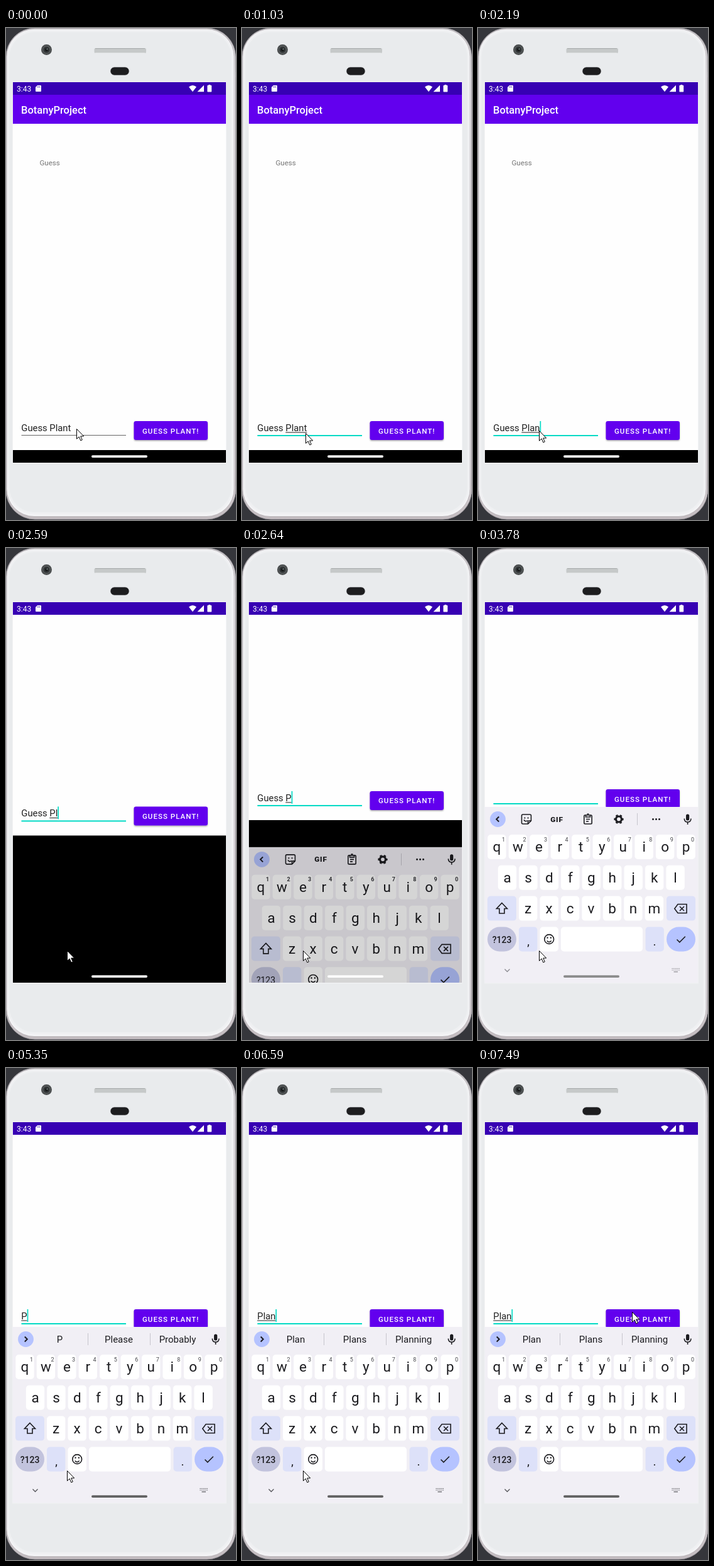
Animation of 366 by 781 pixels, one loop 7990 ms. Source, as an HTML page:

```html
<!DOCTYPE html>
<html lang="en">
<head>
<meta charset="utf-8">
<title>Guess the plant</title>
<style>
html, body { margin: 0; width: 100%; height: 100%; overflow: hidden; background: #35363b; }
svg { display: block; width: 366px; height: 781px; font-family: Roboto, sans-serif; }
text { white-space: pre; }
.line { fill: none; stroke: #1c1c20; stroke-width: 1.6; }
.bold { stroke-width: 2; }
.mid { text-anchor: middle; }
</style>
</head>
<body>
<svg viewBox="0 0 366 781">
  <defs>
    <clipPath id="screen"><rect x="11" y="106" width="339" height="584"/></clipPath>
    <linearGradient id="edge" x2="0" y2="1">
      <stop offset="0" stop-color="#c4c2c5"/><stop offset=".1" stop-color="#e4e2e5"/>
      <stop offset=".9" stop-color="#dcd7da"/><stop offset="1" stop-color="#c2bbbf"/>
    </linearGradient>
    <filter id="lift" x="-10%" y="-20%" width="120%" height="150%">
      <feDropShadow dx="0" dy="1.4" stdDeviation="1" flood-opacity=".35"/>
    </filter>
  </defs>

  <!-- phone -->
  <rect width="366" height="781" fill="#35363b"/>
  <rect x="259" y="0" width="8" height="3" fill="#77757a"/>
  <path d="M365.500 70v8M365.500 727v13" stroke="#77757a"/>
  <rect x="0" y="0" width="365.500" height="780" rx="46" fill="url(#edge)" stroke="#97939a" stroke-width=".8"/>
  <rect x="1" y="1.500" width="362" height="774" rx="44" fill="#f3f3f5" stroke="#a39da2" stroke-width=".6"/>
  <rect x="4" y="5" width="356" height="765" rx="41" fill="#e9ebed" stroke="#eff0f2" stroke-width="3"/>
  <rect x="10" y="85" width="341" height="606.500" fill="#f0f1f3"/>
  <circle cx="64.500" cy="34.500" r="8.500" fill="#4b4e4f"/>
  <circle cx="64.500" cy="34.500" r="5.600" fill="#303435" stroke="#626768"/>
  <circle cx="64.500" cy="34.500" r="2.400" fill="#151718"/>
  <circle cx="65.500" cy="33.500" r="1" fill="#899"/>
  <rect x="140.500" y="32" width="82.500" height="8" rx="2" fill="#c6c9c9"/>
  <path d="M142 32.600h79" stroke="#a6a9a9"/>
  <path d="M142 39.500h79" stroke="#dfe1e1"/>
  <rect x="166" y="62" width="30" height="13" rx="6.500" fill="#1d1d1f" stroke="#cfd1d3" stroke-width=".6"/>

  <g clip-path="url(#screen)">
    <rect x="11" y="106" width="339" height="584" fill="#000"/>
    <g id="app">
      <rect x="11" y="106" width="339" height="564" fill="#fefefe"/>
      <rect x="11" y="106" width="339" height="46" fill="#6200ee"/>
      <text x="24" y="135.500" font-size="16.500" font-weight="500" fill="#fff">BotanyProject</text>
      <text x="53.500" y="217.500" font-size="11.500" fill="#757575">Guess</text>
      <text id="field" x="24.300" y="640" font-size="14.800" fill="#212121"></text>
      <rect id="compose" y="641.500" height="1" fill="#212121"/>
      <rect id="rule" x="24.500" y="646" width="166.500"/>
      <rect id="caret" y="624" width="1.700" height="20" fill="#03dac5"/>
      <rect x="203.500" y="624" width="117.500" height="30" rx="3.300" fill="#6200ee" filter="url(#lift)"/>
      <text x="217" y="643.500" font-size="11.530" font-weight="500" letter-spacing="1.030" fill="#fff">GUESS PLANT!</text>
    </g>

    <g id="board">
      <rect x="11" y="411" width="339" height="279" fill="#f1eff5"/>
      <circle cx="31.500" cy="430.500" r="12.400" fill="#b5c3ff"/>
      <path id="arrow" class="line bold"/>
      <g id="tools">
        <g class="line">
          <path d="M71.500 423h11q2 0 2 2v8l-5 5h-8q-2 0-2-2v-11q0-2 2-2zM84 433h-3q-1.500 0-1.500 1.500v3M73 431.500q2.500 4 6 1"/>
          <path d="M171.500 424h-1q-1.700 0-1.700 1.700v10.600q0 1.700 1.700 1.700h9q1.700 0 1.700-1.700v-10.600q0-1.700-1.700-1.700h-1M171.500 424h7v3h-7zM172 430.500h6M172 434h4"/>
        </g>
        <path d="M73.500 427.500h1.800v2h-1.800zM78.700 427.500h1.800v2h-1.800zM173.500 421.500h3v2h-3z" fill="#1c1c20"/>
        <text x="125.500" y="434.500" class="mid" font-size="11.800" font-weight="800" letter-spacing=".8" fill="#1c1c20">GIF</text>
        <circle cx="224" cy="430.500" r="4.500" fill="none" stroke="#1c1c20" stroke-width="3.200"/>
        <circle cx="224" cy="430.500" r="6.600" fill="none" stroke="#1c1c20" stroke-width="2" stroke-dasharray="3.456" stroke-dashoffset="1.728"/>
        <path d="M253.500 421v19" stroke="#c6c5cc"/>
        <path d="M278.500 430.500h.01M283.500 430.500h.01M288.500 430.500h.01" stroke="#1c1c20" stroke-width="3" stroke-linecap="round"/>
      </g>
      <g id="hints" class="mid" font-size="15" fill="#1c1c20">
        <path d="M130.500 421v19M229.500 421v19" stroke="#c6c5cc"/>
        <text x="85.500" y="436"></text><text x="179.500" y="436"></text><text x="273" y="436"></text>
      </g>
      <rect x="331" y="422.500" width="5.200" height="10" rx="2.600" fill="#1c1c20"/>
      <path class="line" d="M328.300 429.500q0 5.500 5.300 5.500t5.300-5.500M333.600 435v4"/>

      <g id="keys"></g>
      <path id="shift" class="line" d="M38 563.500l8.500 9h-4.500v7.500h-8v-7.500h-4.500z"/>
      <path class="line" d="M318 565.500h14v14h-14l-5.200-7zM321 569l7 7M328 569l-7 7"/>
      <g class="line"><circle cx="113.200" cy="621" r="7.400"/><path d="M109.700 623.500q3.500 4 7 0"/></g>
      <path d="M110.500 617.500v2.300M115.900 617.500v2.300" stroke="#1c1c20" stroke-width="2"/>
      <path class="line" d="M316.500 621.500l4.300 4.300 9-9"/>
      <g id="nav" fill="none" stroke="#55555a">
        <path d="M42.500 668.500l4 4 4-4" stroke-width="1.300"/>
        <path d="M308.500 667.500h12.500M308.500 670h12.500" stroke-width="1.200" stroke-dasharray="1.300 .95"/>
        <path d="M311.500 672.800h6.500" stroke-width="1.200"/>
      </g>
    </g>
    <rect id="pill" x="136" y="678.200" width="89" height="3.700" rx="1.850"/>
  </g>

  <!-- status bar -->
  <rect x="11" y="86" width="339" height="20" fill="#3700b3"/>
  <text x="17" y="100.500" font-size="12.100" fill="#fff">3:43</text>
  <g fill="#fff">
    <path d="M50 91h5q1 0 1 1v8q0 1-1 1h-7q-1 0-1-1v-6z"/>
    <path d="M291 93.500q6-5 12 0l-6 7.800z"/>
    <path d="M304.500 101.300l10.500-10.500v10.500z"/>
    <path d="M322.300 91v-1h3v1h1.200q.7 0 .7.700v9q0 .7-.7.700h-5.400q-.7 0-.7-.7v-9q0-.7.700-.7z"/>
  </g>
  <path d="M50.200 92.500v2M52 92.500v2M53.800 92.500v2" stroke="#3700b3" stroke-width=".8"/>

  <path id="mouse" d="M0 0v15.800l3.700-3.400 2.600 6 2.500-1.100-2.600-5.800h5z" fill="#fff" stroke="#000" stroke-linejoin="round"/>
</svg>

<script>
const LOOP = 7990;
const $ = id => document.getElementById(id);
const set = (el, attrs) => { for (const k in attrs) el.setAttribute(k, attrs[k]); };

// Stepped tracks: [time, value]
const typed = [
  [0, 'Guess Plant'], [2160, 'Guess Plan'], [2530, 'Guess Pla'], [2590, 'Guess Pl'], [2640, 'Guess P'],
  [2690, 'Guess '], [2740, 'Guess'], [2790, 'Gues'], [2840, 'Gue'], [2890, 'Gu'], [2940, 'G'], [2990, ''],
  [5260, 'P'], [5720, 'Pl'], [6290, 'Pla'], [6530, 'Plan']
];
const caretOn = [
  [0, 0], [500, 1], [1000, 0], [1510, 1], [2100, 0], [2160, 1], [3780, 0], [4280, 1], [4770, 0],
  [5260, 1], [7000, 0], [7490, 1]
];
const upper = [[0, false], [5170, true], [5310, false]];
const words = [
  [0, ''], [5350, 'P Please Probably'], [5960, 'Pl Please Plus'],
  [6320, 'Pla Play Place'], [6590, 'Plan Plans Planning']
];

// Smooth tracks: [time, ...values]
const pan = [[2500, 0], [2530, -100], [2560, -170], [2590, -213], [2620, -230], [2640, -238], [2700, -241]];
const rise = [[2610, 85, .6], [2640, 64.5, .83], [2680, 38, 1], [2730, 16, 1], [2790, 5, 1], [2860, 0, 1]];
const pillTone = [[3420, 255], [3520, 190], [3780, 140], [4280, 98]];
const navFade = [[3300, 0], [3520, .3], [3780, .65], [4280, 1]];
const mousePath = [
  [800, 112, 636], [900, 109, 643], [980, 104, 646], [1090, 97, 639],
  [6780, 97, 639], [6900, 118, 612], [7050, 178, 535], [7200, 240, 440],
  [7310, 261, 400], [7390, 257, 390], [7490, 245, 387]
];

const step = (track, t) => track.findLast(k => k[0] <= t)[1];
function tween(track, t) {
  const i = track.findIndex(k => k[0] > t);
  if (i === 0) return track[0].slice(1);
  if (i < 0) return track.at(-1).slice(1);
  const a = track[i - 1], b = track[i], p = (t - a[0]) / (b[0] - a[0]);
  return a.slice(1).map((v, j) => v + (b[j + 1] - v) * p);
}

function add(tag, attrs, label = '') {
  const el = document.createElementNS('http://www.w3.org/2000/svg', tag);
  set(el, attrs);
  el.textContent = label;
  $('keys').append(el);
  return el;
}
const key = (x, y, width, fill, rx = 5) => add('rect', { x, y, width, height: 39, rx, fill });
const label = (x, y, size, s) => add('text', { x, y, 'font-size': size, class: 'mid', fill: '#1c1c20' }, s);

const letters = [], digits = [];
[['qwertyuiop', 30], ['asdfghjkl', 46.5], ['zxcvbnm', 79.7]].forEach(([row, x0], r) => {
  const y = 455 + r * 48.8;
  [...row].forEach((ch, i) => {
    const x = x0 + i * 33.45;
    key(x - 14.7, y, 29.4, '#fff');
    letters.push(label(x, Math.round(y + 27), 22.5, ch));
    if (!r) digits.push(label(x + 10.6, y + 10.5, 9, (i + 1) % 10));
  });
});
const tint = '#dde1f9';
key(15, 552.6, 46, tint);
key(300, 552.6, 46, tint);
key(15, 601.5, 46, '#c2c3dd', 19.5);
key(65, 601.5, 29.4, tint);
key(98.5, 601.5, 29.4, '#fff');
key(132, 601.5, 130, '#fff');
key(266.5, 601.5, 29.4, tint);
key(300, 601.5, 46, '#b5c3ff', 19.5);
const symbols = label(38, 627, 14, '?123');
const points = [label(80, 631, 19, ','), label(281, 631, 19, '.')];

function drawField(t) {
  const s = step(typed, t), focused = t >= 500, field = $('field');
  if (field.textContent !== s) field.textContent = s;
  const start = s.lastIndexOf(' ') + 1, x0 = 24.3;
  const width = n => n ? field.getSubStringLength(0, n) : 0;
  const end = x0 + width(s.length), from = x0 + width(start);
  set($('compose'), { x: from, width: t >= 820 ? Math.max(0, end - from) : 0 });
  set($('caret'), { x: end, opacity: step(caretOn, t) });
  set($('rule'), focused ? { height: 2, fill: '#03dac5' } : { height: 1, fill: '#666' });
}

function drawBoard(t) {
  const [y, alpha] = tween(rise, t);
  set($('board'), { transform: `translate(0 ${y})`, opacity: t < 2610 ? 0 : alpha });
  const caps = step(upper, t), settled = t >= 3520;
  for (const el of letters) {
    const ch = el.textContent;
    el.textContent = caps ? ch.toUpperCase() : ch.toLowerCase();
  }
  for (const el of digits) set(el, { 'font-weight': settled ? 400 : 700, fill: settled ? '#45454b' : '#38383d' });
  for (const el of points) set(el, { opacity: +settled });
  set(symbols, { 'font-weight': settled ? 500 : 400 });
  $('shift').style.fill = caps ? '#1c1c20' : 'none';

  const list = step(words, t);
  set($('tools'), { opacity: list ? 0 : 1 });
  set($('hints'), { opacity: list ? 1 : 0 });
  set($('arrow'), { d: list ? 'M29.800 426.500l4 4-4 4' : 'M33.300 426.500l-4 4 4 4' });
  const parts = list.split(' ');
  $('hints').querySelectorAll('text').forEach((el, i) => { el.textContent = parts[i] || ''; });

  const tone = Math.round(tween(pillTone, t)[0]);
  set($('pill'), { fill: `rgb(${tone},${tone},${tone})` });
  set($('nav'), { opacity: tween(navFade, t)[0] });
}

function draw(t) {
  set($('app'), { transform: `translate(0 ${tween(pan, t)[0]})` });
  drawField(t);
  drawBoard(t);
  const [x, y] = tween(mousePath, t);
  set($('mouse'), { transform: `translate(${Math.round(x) + .5} ${Math.round(y) + .5})` });
}

const began = performance.now();
function tick() {
  draw((performance.now() - began) % LOOP);
  requestAnimationFrame(tick);
}
tick();
</script>
</body>
</html>
```
